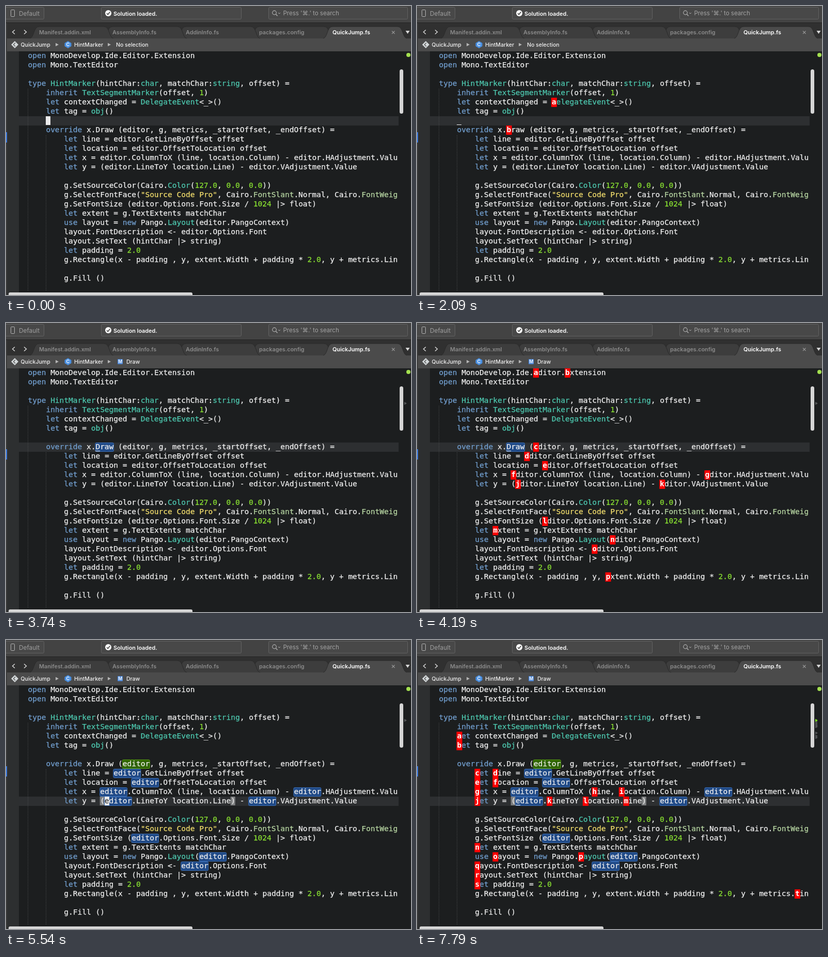
Animation, 784 px wide and 561 px high, one loop 8000 ms. Source, as an HTML page with a canvas:

```html
<!DOCTYPE html>
<html lang="en">
<head>
<meta charset="utf-8">
<title>Quick jump in a code editor</title>
<style>
html, body { margin: 0; width: 100%; height: 100%; overflow: hidden; background: #1c1e1f; }
canvas { display: block; }
</style>
</head>
<body>
<canvas id="stage" width="784" height="561"></canvas>
<script>
const ctx = document.getElementById('stage').getContext('2d');
const LOOP = 8000;
const LEFT = 42.5, TOP = 88, ROW = 18, CHAR = 8.727;
const MONO = '14.5px "DejaVu Sans Mono", monospace';
const UI = 'Inter, sans-serif';
const WHITE = '#f0f0f0', RED = '#ff0000';

const lines = [
  'open MonoDevelop.Ide.Editor.Extension',
  'open Mono.TextEditor',
  '',
  'type HintMarker(hintChar:char, matchChar:string, offset) =',
  '    inherit TextSegmentMarker(offset, 1)',
  '    let contextChanged = DelegateEvent<_>()',
  '    let tag = obj()',
  '',
  '    override x.Draw (editor, g, metrics, _startOffset, _endOffset) =',
  '        let line = editor.GetLineByOffset offset',
  '        let location = editor.OffsetToLocation offset',
  '        let x = editor.ColumnToX (line, location.Column) - editor.HAdjustment.Valu',
  '        let y = (editor.LineToY location.Line) - editor.VAdjustment.Value',
  '',
  '        g.SetSourceColor(Cairo.Color(127.0, 0.0, 0.0))',
  '        g.SelectFontFace("Source Code Pro", Cairo.FontSlant.Normal, Cairo.FontWeig',
  '        g.SetFontSize (editor.Options.Font.Size / 1024 |> float)',
  '        let extent = g.TextExtents matchChar',
  '        use layout = new Pango.Layout(editor.PangoContext)',
  '        layout.FontDescription <- editor.Options.Font',
  '        layout.SetText (hintChar |> string)',
  '        let padding = 2.0',
  '        g.Rectangle(x - padding , y, extent.Width + padding * 2.0, y + metrics.Lin',
  '',
  '        g.Fill ()'
];

// Later rules override earlier ones.
const syntax = [
  [/\b(open|type|inherit|let|override|use|new)\b/g, '#729fcf'],
  [/\b(HintMarker|TextSegmentMarker|DelegateEvent|obj|Color|Layout)\b|(?<=:)(char|string)\b/g, '#4ec9b0'],
  [/\bFont(Slant|Weig)\b/g, '#b8d7a3'],
  [/\b\d+(\.\d+)?\b/g, '#8ae232'],
  [/"[^"]*"/g, '#f0dc6c']
];

const colors = lines.map(text => {
  const row = Array(text.length).fill(WHITE);
  for (const [rule, color] of syntax)
    for (const m of text.matchAll(rule)) row.fill(color, m.index, m.index + m[0].length);
  return row;
});

const find = rule => lines.flatMap((text, row) =>
  [...text.matchAll(rule)].map(m => ({ row, col: m.index })));

const editors = find(/\beditor\b/g);
const hintSets = [
  { from: 1800, to: 2840, spots: find(/\bd/gi), keys: 'ab' },
  { from: 4190, to: 5390, spots: find(/\be/gi), keys: 'abcdefgjklmnop' },
  { from: 7490, to: LOOP, spots: find(/\bl/gi), keys: 'abcdefghijklmnopqrst' }
];
const carets = [
  { from: 0, row: 7, col: 4 },
  { from: 2840, row: 8, col: 15 },
  { from: 5390, row: 12, col: 17 }
];
const blinks = [450, 1350, 2090, 2840, 3740, 4490, 5240, 5390, 6140, 6890, 7790];

const colX = col => LEFT + col * CHAR;
const rowY = row => TOP + row * ROW;

function box(x, y, w, h, fill, stroke, r = 0) {
  ctx.beginPath();
  ctx.roundRect(x, y, w, h, r);
  if (fill) { ctx.fillStyle = fill; ctx.fill(); }
  if (stroke) { ctx.strokeStyle = stroke; ctx.lineWidth = 1; ctx.stroke(); }
}

function poly(points, fill, stroke, width = 1) {
  ctx.beginPath();
  for (let i = 0; i < points.length; i += 2) ctx.lineTo(points[i], points[i + 1]);
  if (fill) { ctx.closePath(); ctx.fillStyle = fill; ctx.fill(); }
  if (stroke) { ctx.strokeStyle = stroke; ctx.lineWidth = width; ctx.stroke(); }
}

function disc(x, y, r, fill) {
  ctx.beginPath();
  ctx.arc(x, y, r, 0, 7);
  ctx.fillStyle = fill;
  ctx.fill();
}

function label(text, x, y, font, color) {
  ctx.font = font;
  ctx.fillStyle = color;
  ctx.fillText(text, x, y);
}

function toolbar() {
  box(0, 0, 784, 33, '#434343');
  box(-5.5, 2.5, 79, 23, '#484848', '#626262', 2);
  box(9.5, 7.5, 7, 13, null, '#b8b8b8', 1);
  label('Default', 25, 18.5, '11.8px ' + UI, '#a0a0a0');
  box(184.5, 2.5, 271, 23, '#484848', '#626262', 2);
  disc(198, 14, 6, '#ffffff');
  poly([195, 14.2, 197.3, 16.6, 201.2, 11.6], null, '#444', 1.6);
  label('Solution loaded.', 208, 18.5, '600 10.8px ' + UI, '#ffffff');
  box(508.5, 2.5, 269, 23, '#484848', '#626262', 2);
  ctx.beginPath();
  ctx.arc(519.5, 13, 3.8, 0, 7);
  ctx.strokeStyle = '#b0b0b0';
  ctx.lineWidth = 1.2;
  ctx.stroke();
  poly([522.3, 16, 525.5, 19.3], null, '#b0b0b0', 1.4);
  poly([527, 13, 529, 15, 531, 13], null, '#b0b0b0', 1);
  label("Press '⌘.' to search", 536.5, 18, '11.5px ' + UI, '#a4a4a4');
}

function tab(x, w, fill) {
  ctx.beginPath();
  ctx.moveTo(x, 63);
  ctx.bezierCurveTo(x + 9, 61, x + 7, 40, x + 18, 40);
  ctx.lineTo(x + w - 18, 40);
  ctx.bezierCurveTo(x + w - 7, 40, x + w - 9, 61, x + w, 63);
  ctx.fillStyle = fill;
  ctx.fill();
  ctx.strokeStyle = '#2a2a2a';
  ctx.lineWidth = 1;
  ctx.stroke();
}

function tabs() {
  box(0, 33, 784, 30, '#303030');
  box(0, 32, 784, 1, '#222');
  poly([17, 46.5, 12.5, 50.5, 17, 54.5], null, '#e0e0e0', 1.4);
  poly([35, 46.5, 39.5, 50.5, 35, 54.5], null, '#e0e0e0', 1.4);
  const names = ['Manifest.addin.xml', 'AssemblyInfo.fs', 'AddinInfo.fs', 'packages.config', 'QuickJump.fs'];
  for (let i = 3; i >= 0; i--) tab(46 + 142 * i, 162, '#3d3d3d');
  tab(614, 162, '#4b4b4b');
  names.forEach((name, i) =>
    label(name, 64 + 142 * i, 55, '600 10.8px ' + UI, i < 4 ? '#8c8c8c' : '#ffffff'));
  poly([747, 48.5, 752.5, 54], null, '#999', 1.1);
  poly([752.5, 48.5, 747, 54], null, '#999', 1.1);
  poly([773.5, 48, 781.5, 48, 777.5, 54], '#d8d8d8');
}

function crumbs(t) {
  const font = '500 10.5px ' + UI, ink = '#f2f2f2';
  box(0, 63, 784, 25, '#4b4b4b');
  poly([17, 68, 24, 75, 17, 82, 10, 75], '#d4d8da');
  poly([18, 71.5, 14.5, 75, 18, 78.5], null, '#555', 1.3);
  label('QuickJump', 28.5, 79, font, ink);
  poly([96, 71.7, 102, 75, 96, 78.3], '#b5b5b5');
  poly([120, 68, 126.5, 72, 126.5, 78, 120, 82, 113.5, 78, 113.5, 72], '#4a90e2');
  label('C', 116.6, 78.2, '600 9px ' + UI, '#fff');
  label('HintMarker', 132, 79, font, ink);
  poly([197, 71.7, 203, 75, 197, 78.3], '#b5b5b5');
  if (t < 2840) {
    label('No selection', 213, 79, font, ink);
  } else {
    box(216, 70, 10, 10, '#4a86d8', null, 1);
    label('M', 217.3, 78.3, '600 8.5px ' + UI, '#fff');
    label('Draw', 233, 79, font, ink);
  }
}

function guide(x, y) {
  ctx.fillStyle = '#56585a';
  for (; y < 554; y += 3) ctx.fillRect(x, y, 1, 1);
}

function usage({ row, col }, length, fill, stroke) {
  box(colX(col) - 0.5, rowY(row) + 0.5, length * CHAR + 0.6, 17, fill, stroke, 2);
}

function marker(row, color) {
  const y = 156 + (row - 8) * 3.05;
  poly([771, y - 3, 776, y, 771, y + 3], color);
}

function code() {
  ctx.font = MONO;
  lines.forEach((text, row) => {
    for (let from = 0, to; from < text.length; from = to) {
      for (to = from + 1; to < text.length && colors[row][to] === colors[row][from];) to++;
      ctx.fillStyle = ctx.strokeStyle = colors[row][from];
      ctx.lineWidth = 0.25;
      const args = [text.slice(from, to), colX(from), rowY(row) + 13];
      ctx.fillText(...args);
      ctx.strokeText(...args);
    }
  });
}

function drawCaret({ row, col }, on) {
  const x = Math.round(colX(col)), y = rowY(row);
  if (!on) return box(x, y + 16, 9, 1, WHITE);
  box(x, y, 9, 17, '#ebebeb');
  label(lines[row][col] || '', colX(col), y + 13, MONO, '#1c1e1f');
}

function hints({ spots, keys }) {
  spots.forEach(({ row, col }, i) => {
    const x = colX(col), y = rowY(row);
    box(x - 0.9, y, 11, ROW, RED);
    label(keys[i], x, y + 13, 'bold ' + MONO, '#fff');
  });
}

function editor(t) {
  const caret = carets.findLast(c => t >= c.from);
  const on = blinks.filter(b => t >= b).length % 2 === 0;
  box(0, 88, 784, 473, '#1c1e1f');
  box(0, 88, 25, 473, '#2d2f30');
  box(25, rowY(caret.row), 735, ROW, '#2d2f31');

  ctx.save();
  ctx.beginPath();
  ctx.rect(0, 88, 760, 473);
  ctx.clip();
  guide(42, 161);
  guide(77, 251);
  if (t >= 3140 && t < 5390) usage(carets[1], 4, '#204a87', '#3a6db5');
  if (t >= 5390) for (const col of [16, 45]) box(colX(col) - 0.5, rowY(12), 9, 17, '#7d7f80');
  if (t >= 5540) editors.forEach((spot, i) =>
    usage(spot, 6, i ? '#204a87' : '#2f6400', i ? '#3a6db5' : '#559a14'));
  code();
  drawCaret(caret, on);
  hintSets.filter(h => t >= h.from && t < h.to).forEach(hints);
  ctx.restore();

  disc(779, 95, 4, '#a3e04f');
  box(762, 123, 7, 86, '#d6d6d6', null, 3.5);
  if (t >= 5840) {
    editors.slice(1).forEach(e => marker(e.row, '#555759'));
    marker(8, '#7fe01f');
  } else if (t >= 3440) marker(8, '#555759');
  box(5, 556, 356, 8, '#d6d6d6', null, 3);
}

function frame(now) {
  const t = now % LOOP;
  editor(t);
  toolbar();
  tabs();
  crumbs(t);
  box(0, 33, 2, 528, '#3a3a3a');
  box(0, 245, 2, 20, '#3f7fe8');
  requestAnimationFrame(frame);
}
requestAnimationFrame(frame);
</script>
</body>
</html>
```
